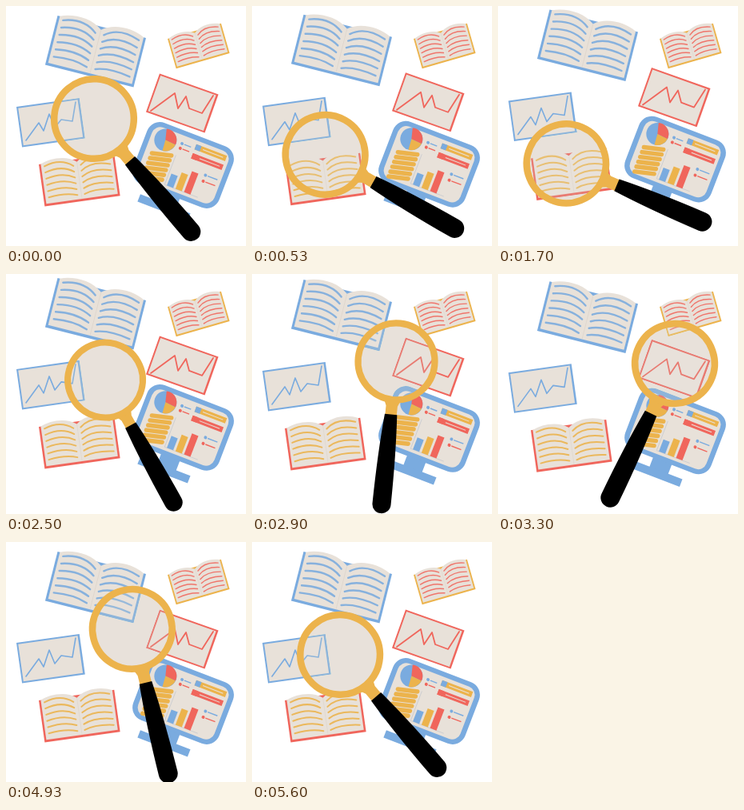
Write an HTML page with a canvas that moves like this. It is 300x300 px and loops after 5630 ms.

```html
<!DOCTYPE html>
<html lang="en">
<head>
<meta charset="utf-8">
<title>Research desk</title>
<style>
  html, body { margin: 0; width: 100%; height: 100%; overflow: hidden; background: #fff; }
  canvas { display: block; width: 300px; height: 300px; }
</style>
</head>
<body>
<canvas id="stage"></canvas>
<script>
const LOOP = 5630, BOB = 4100, RAD = Math.PI / 180;
const BLUE = '#7aabdf', RED = '#f0665c', YELLOW = '#ecb34c', PAPER = '#e8e1d9';

const canvas = document.getElementById('stage');
const ctx = canvas.getContext('2d');
const ratio = window.devicePixelRatio || 1;
canvas.width = canvas.height = 300 * ratio;

// Resting places of the magnifier: lens centre and handle angle
const OVER_CARD = { x: 110, y: 141, deg: 49.3 };
const OVER_BOOK = { x: 83.5, y: 203, deg: 20.5 };
const OVER_CHART = { x: 221, y: 112, deg: 115.7 };

// Each move bends towards (x, y); delay > 1 makes a slower start
const MOVES = [
  { start: 0, end: 850, from: OVER_CARD, to: OVER_BOOK, x: 96, y: 178, delay: 1, dip: 0 },
  { start: 1060, end: 3280, from: OVER_BOOK, to: OVER_CHART, x: 116, y: 92, delay: 1.85, dip: .06 },
  { start: 4020, end: LOOP, from: OVER_CHART, to: OVER_CARD, x: 172, y: 84, delay: 1, dip: 0 }
];

const smooth = u => u * u * (3 - 2 * u);
const lift = t => t < BOB ? 4 * (1 - Math.cos(2 * Math.PI * t / BOB)) : 0;

function pose(t) {
  const m = MOVES.findLast(move => t >= move.start);
  const progress = Math.min(1, (t - m.start) / (m.end - m.start));
  const u = smooth(progress ** m.delay), v = 1 - u;
  const bend = c => m.from[c] * v * v + 2 * m[c] * u * v + m.to[c] * u * u;
  return {
    x: bend('x'),
    y: bend('y'),
    deg: m.from.deg * v + m.to.deg * u,
    scale: 1 - m.dip * Math.sin(Math.PI * u)
  };
}

function at(x, y, deg, scale, draw) {
  ctx.save();
  ctx.translate(x, y);
  ctx.rotate(deg * RAD);
  ctx.scale(scale, scale);
  draw();
  ctx.restore();
}

function rect(x, y, w, h, color, r = 0) {
  ctx.fillStyle = color;
  ctx.beginPath();
  ctx.roundRect(x, y, w, h, r);
  ctx.fill();
}

function stroke(path, color, width) {
  ctx.strokeStyle = color;
  ctx.lineWidth = width;
  ctx.lineCap = ctx.lineJoin = 'round';
  ctx.stroke(new Path2D(path));
}

function fill(path, color) {
  ctx.fillStyle = color;
  ctx.fill(new Path2D(path));
}

function disc(x, y, r, color, from = 0, to = 360) {
  ctx.fillStyle = color;
  ctx.beginPath();
  if (to - from < 360) ctx.moveTo(x, y);
  ctx.arc(x, y, r, from * RAD, to * RAD);
  ctx.fill();
}

function book(x, y, deg, scale, cover, ink) {
  at(x, y, deg, scale, () => {
    rect(0, 0, 114, 63.5, cover);
    fill('M3 0 C18 -7 42 -8 57 4 C71 -8 95 -8 111 0 V60 H3 Z', PAPER);
    stroke('M57 5 V59', '#ded6cd', .8);
    ctx.globalAlpha = .88;
    for (let i = 0; i < 6; i++) {
      const row = 4 + i * 9.4, bend = 9 - i;
      stroke(`M8 ${row} Q33 ${row - bend} 51 ${row + bend * .6}`, ink, 2.4);
      stroke(`M62 ${row + bend * .6} Q79 ${row - bend} 106 ${row + 1}`, ink, 2.4);
    }
    ctx.globalAlpha = 1;
  });
}

function card(x, y, deg, w, h, color) {
  at(x, y, deg, 1, () => {
    rect(0, 0, w, h, color);
    rect(2, 2, w - 4.5, h - 4, PAPER);
  });
}

function legend(x, y, gap, length) {
  [BLUE, RED].forEach((color, i) => {
    disc(x, y + i * gap, 2, color);
    rect(x + 3, y + i * gap - .7, length, 1.4, color);
  });
}

function label(y, color, badge) {
  rect(6, y, 41, 7, color);
  rect(6, y, 7, 7, badge);
  rect(16, y + 3, 27, 1, PAPER);
}

function monitor(x, y) {
  at(x, y, 21, 1, () => {
    rect(-14, 35, 25, 22, BLUE);
    rect(-37, 53, 67, 10, BLUE);
    rect(-57.5, -41, 115, 82, BLUE, 17);
    rect(-51, -35, 102, 70, PAPER, 11);

    disc(-32, -21.5, 14, BLUE);
    disc(-32, -21.5, 14, RED, -105, 5);
    disc(-32, -21.5, 14, YELLOW, 5, 85);
    for (let i = 0; i < 6; i++) {
      at(-30, -3 + i * 6.5, -14, 1, () => rect(-15, -2.7, 30, 5.4, YELLOW, 2.7));
    }

    stroke('M-13 -8 V31 H31', '#c9cbd0', .8);
    [BLUE, YELLOW, RED].forEach((color, i) => {
      const height = 16 + i * 6;
      rect(-10 + i * 11.5, 31 - height, 8.5, height, color);
    });

    label(-30.5, YELLOW, BLUE);
    label(-18.5, RED, RED);
    legend(-11, -24.7, 6.3, 9);
    legend(30.5, 1.7, 8, 13);
  });
}

function magnifier({ x, y, deg, scale }) {
  at(x, y, deg, scale, () => {
    // Tint the white behind the glass, then soften what lies under it
    ctx.globalCompositeOperation = 'darken';
    disc(0, 0, 48, PAPER);
    ctx.globalCompositeOperation = 'source-over';
    ctx.globalAlpha = .17;
    disc(0, 0, 48, PAPER);
    ctx.globalAlpha = 1;
    fill('M50 -11 L58 -7.5 H72 V7.5 H58 L50 11 Z', YELLOW);
    fill('M69 -8 Q120 -12 186 -12 A12 12 0 0 1 186 12 Q120 12 69 8 Z', '#000');
    ctx.strokeStyle = YELLOW;
    ctx.lineWidth = 8.5;
    ctx.beginPath();
    ctx.arc(0, 0, 49.8, 0, 2 * Math.PI);
    ctx.stroke();
  });
}

function draw(t) {
  ctx.setTransform(ratio, 0, 0, ratio, 0, 0);
  ctx.fillStyle = '#fff';
  ctx.fillRect(0, 0, 300, 300);

  book(202, 41, -16, .61, YELLOW, RED);

  ctx.save();
  ctx.translate(0, -lift(t));
  book(64.5, 12, 14.2, 1, BLUE, BLUE);
  book(41, 198, -8, .835, RED, YELLOW);
  card(13, 126, -8, 79.5, 51, BLUE);
  stroke('M25 168 L41 146 L47 156 L54 135 L61 152 L69 142 L83 144 L87 120', BLUE, 1.6);
  card(192, 84.5, 19.5, 78, 51, RED);
  stroke('M181 131 L211 109 L215 128 L225 113 L229 128 L245 134 L259 112', RED, 1.8);
  monitor(221.5, 199);
  ctx.restore();

  magnifier(pose(t));
}

// Pictures change in steps of 30 and 70 ms
function tick() {
  const t = performance.now() % LOOP;
  draw(Math.floor(t / 100) * 100 + (t % 100 >= 30 ? 30 : 0));
  requestAnimationFrame(tick);
}
tick();
</script>
</body>
</html>
```
